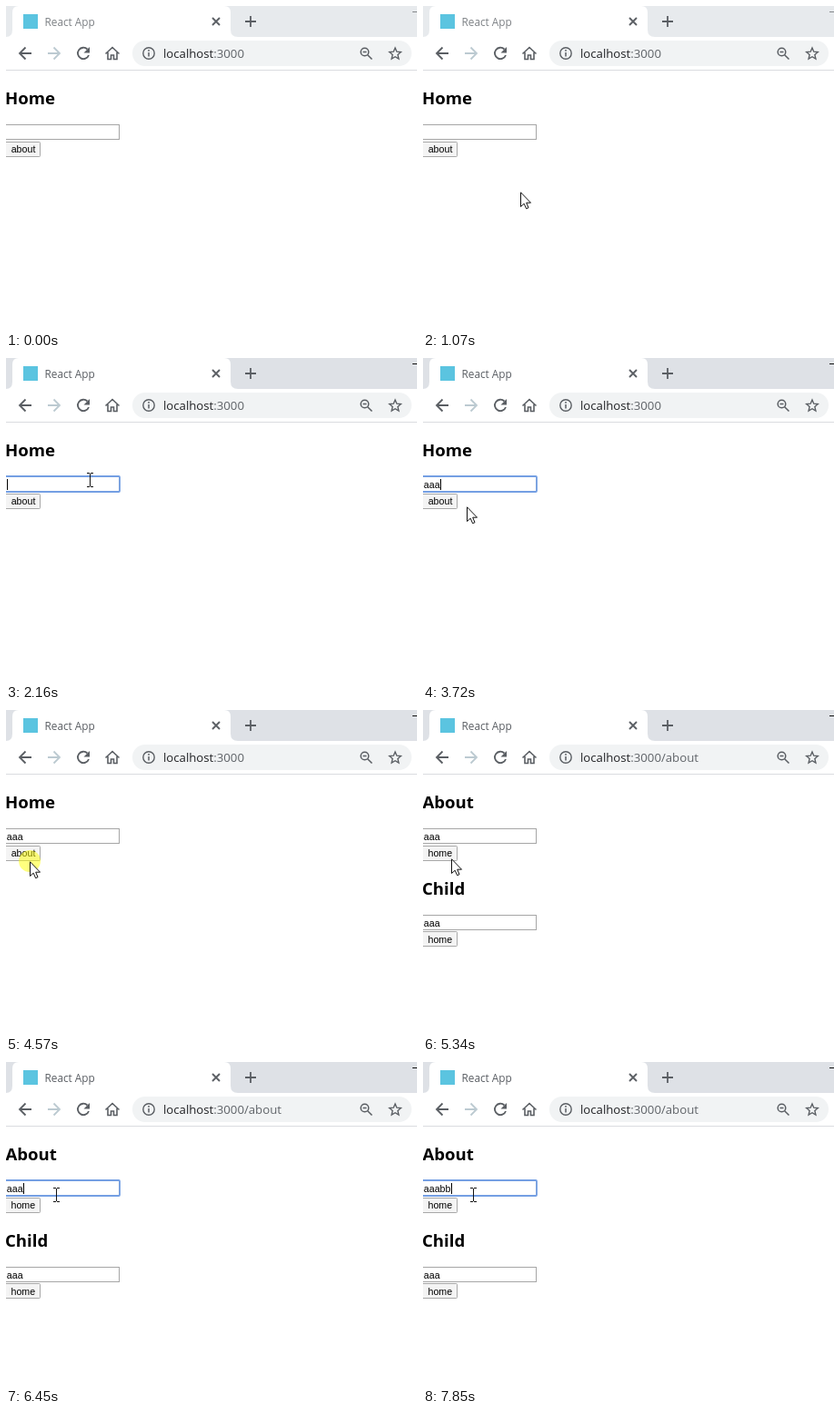
Write an HTML page that moves like this. It is 452 by 356 pixels and loops after 8000 ms.

```html
<!DOCTYPE html>
<html lang="en">
<head>
<meta charset="utf-8">
<title>Routed form demo</title>
<style>
html, body { margin: 0; width: 100%; height: 100%; overflow: hidden; background: #fff; }
svg { display: block; width: 100vw; height: 100vh; }
text { white-space: pre; }
.ui { font-family: "Open Sans", "Noto Sans", sans-serif; }
.heading { font: 700 18.6px "Open Sans", "Noto Sans", sans-serif; }
.control { font: 10.67px "Liberation Sans", Arial, sans-serif; }
.icon { fill: none; stroke: #5a5e63; stroke-width: 1.8; }
.crisp { shape-rendering: crispEdges; }

.strip, .tabText, .minimise, .home, .about, .ring, .typed, .caret,
.cursor, .arrow, .beam, .click { animation: 8s step-end infinite; }

.strip { animation-name: strip; }
.tabText { animation-name: tab-text; }
.minimise { animation-name: minimise; }
.home { animation-name: home; }
.about { animation-name: about; }
.ring { animation-name: ring; }
.typed { animation-name: typed; }
.caret { animation-name: caret; }
.cursor { animation-name: cursor; }
.arrow { animation-name: arrow; }
.beam { animation-name: beam; }
.click { animation-name: click; }

/* Window gains focus */
@keyframes strip { 0% { fill: #e7eaed } 25%, 100% { fill: #dee1e6 } }
@keyframes tab-text { 0% { fill: #7d8185 } 25%, 100% { fill: #5a5e63 } }
@keyframes minimise { 0% { fill: #85888b } 25%, 100% { fill: #111 } }

/* Page change */
@keyframes home { 0% { opacity: 1 } 59.125%, 100% { opacity: 0 } }
@keyframes about { 0% { fill-opacity: 0; stroke-opacity: 0 } 59.125%, 100% { fill-opacity: 1; stroke-opacity: 1 } }

/* Text field */
@keyframes ring { 0%, 57.125% { opacity: 0 } 25%, 79.625%, 100% { opacity: 1 } }
@keyframes typed {
  0% { transform: none }
  35.75% { transform: translateX(6px) }
  38.75% { transform: translateX(12px) }
  41.5% { transform: translateX(18px) }
  94.25% { transform: translateX(24px) }
  98.125%, 100% { transform: translateX(30px) }
}
@keyframes caret {
  0%, 32%, 48.375%, 57.125%, 86.75% { opacity: 0 }
  25%, 35.75%, 55.125%, 79.625%, 92.25%, 100% { opacity: 1 }
}

/* Pointer */
@keyframes cursor {
  0% { transform: translate(327px, 332px) }
  9.5% { transform: translate(327px, 332px); animation-timing-function: steps(4) }
  13.375% { transform: translate(107px, 204px); animation-timing-function: steps(5) }
  18.25% { transform: translate(92px, 139px) }
  19.25% { transform: translate(92px, 135px) }
  20.25% { transform: translate(92px, 134px) }
  44.5% { transform: translate(78px, 149px); animation-timing-function: steps(2) }
  46.5% { transform: translate(48px, 163px); animation-timing-function: steps(2) }
  48.375% { transform: translate(36px, 167px); animation-timing-function: steps(5) }
  53.125% { transform: translate(26px, 167px) }
  54.125% { transform: translate(26px, 166px) }
  65.75% { transform: translate(26px, 166px); animation-timing-function: steps(5) }
  70.75% { transform: translate(51px, 151px) }
  72.75% { transform: translate(52px, 148px) }
  74.625% { transform: translate(55px, 147px) }
  76.625%, 100% { transform: translate(55px, 146px) }
}
@keyframes arrow { 0%, 18.25%, 74.625%, 100% { opacity: 0 } 9.5%, 44.5% { opacity: 1 } }
@keyframes beam { 0%, 44.5% { opacity: 0 } 18.25%, 74.625%, 100% { opacity: 1 } }
@keyframes click {
  0%, 27%, 59.125%, 80.625%, 100% { opacity: 0 }
  25%, 57.125%, 79.625% { opacity: .5 }
}
</style>
</head>
<body>
<svg viewBox="0 0 452 356" preserveAspectRatio="none">
  <defs>
    <rect id="field" class="crisp" x="-1.5" y=".5" width="126" height="16" fill="#fff" stroke="#a6a6a6"/>
    <rect id="button" x="-2.5" y=".5" width="40" height="16" rx=".8" fill="#f4f4f4" stroke="#a8a8a8"/>
  </defs>
  <rect width="452" height="356" fill="#fff"/>

  <!-- Tab strip -->
  <rect class="strip" width="452" height="34" fill="#e7eaed"/>
  <path d="M0 34Q7 34 7 26V7Q7 0 14 0H240Q247 0 247 7V26Q247 34 255 34Z" fill="#fff"/>
  <rect x="19" y="9" width="16" height="16" fill="#5bc4e0"/>
  <text class="ui tabText" x="42.5" y="22" font-size="11.8">React App</text>
  <path class="icon" d="M227 13l8 8m0-8l-8 8" stroke-width="1.6"/>
  <path class="icon" d="M263 17h12M269 11v12"/>
  <rect class="minimise" x="447" y="6" width="5" height="1"/>

  <!-- Toolbar -->
  <g class="icon">
    <path d="M28 52H15.5M21.5 45.5L15 52l6.5 6.5"/>
    <path d="M46 52h12.500M52.500 45.500L59 52l-6.500 6.500" stroke="#bccad1"/>
    <path d="M89.500 47.500A6.200 6.200 0 1 0 91 54"/>
    <path d="M92 45v6.500h-6.500Z" fill="#5a5e63" stroke="none"/>
    <path d="M109.500 52.500L117 45.500l7.500 7M112 51v7.500h3.500V54h3v4.500h3.500V51" stroke-width="1.6"/>
  </g>
  <rect x="139" y="38" width="307" height="28" rx="14" fill="#f1f3f4"/>
  <g class="icon" stroke-width="1.4">
    <circle cx="157" cy="52" r="6.200" style="stroke-width:1.4"/>
    <path d="M157 51v4.500M157 48v1.700" style="stroke-width:1.5"/>
    <circle cx="394.500" cy="50.500" r="4.300" style="stroke-width:1.5"/>
    <path d="M397.700 53.700l4.800 4.800M392.500 50.500h4" style="stroke-width:1.5"/>
    <path d="M428 46l1.800 4.200 4.500.4-3.400 3 1 4.400-3.900-2.300-3.900 2.300 1-4.400-3.400-3 4.500-.4Z" style="stroke-width:1.4"/>
  </g>
  <text class="ui" x="173" y="57" font-size="13.2" fill="#202124">localhost<tspan fill="#5f6368">:3000<tspan class="about">/about</tspan></tspan></text>
  <rect y="70" width="452" height="1" fill="#dadce0"/>

  <!-- Shared field and button -->
  <use href="#field" y="130"/>
  <use href="#button" y="149"/>
  <text class="control" x=".8" y="143">aaabb</text>
  <g class="typed">
    <rect x="1" y="133" width="40" height="12" fill="#fff"/>
    <rect class="caret" x="1" y="133" width="1" height="12"/>
  </g>
  <rect class="ring" x="-3" y="130" width="128" height="17" rx="1" fill="none" stroke="#749fe3" stroke-width="1.8"/>

  <g class="home">
    <text class="heading" x="-1" y="108">Home</text>
    <text class="control" x="5.700" y="161">about</text>
  </g>
  <g class="about">
    <text class="heading" x="-.5" y="108">About</text>
    <text class="control" x="5.500" y="161">home</text>
    <text class="heading" x="-1" y="203">Child</text>
    <use href="#field" y="225"/>
    <text class="control" x=".8" y="238">aaa</text>
    <use href="#button" y="243"/>
    <text class="control" x="5.500" y="256">home</text>
  </g>

  <g class="cursor">
    <circle class="click" r="12" fill="#ff0"/>
    <path class="arrow" d="M.5 .8V16.500L4.200 13.200L6.600 18.700L9 17.700L6.700 12.200H11.500Z" fill="#fff" stroke="#111"/>
    <path class="beam crisp" d="M-3-7.500H0M1-7.500H4M.5-7V7M-3 7.500H0M1 7.500H4" fill="none" stroke="#111"/>
  </g>
</svg>
</body>
</html>
```
